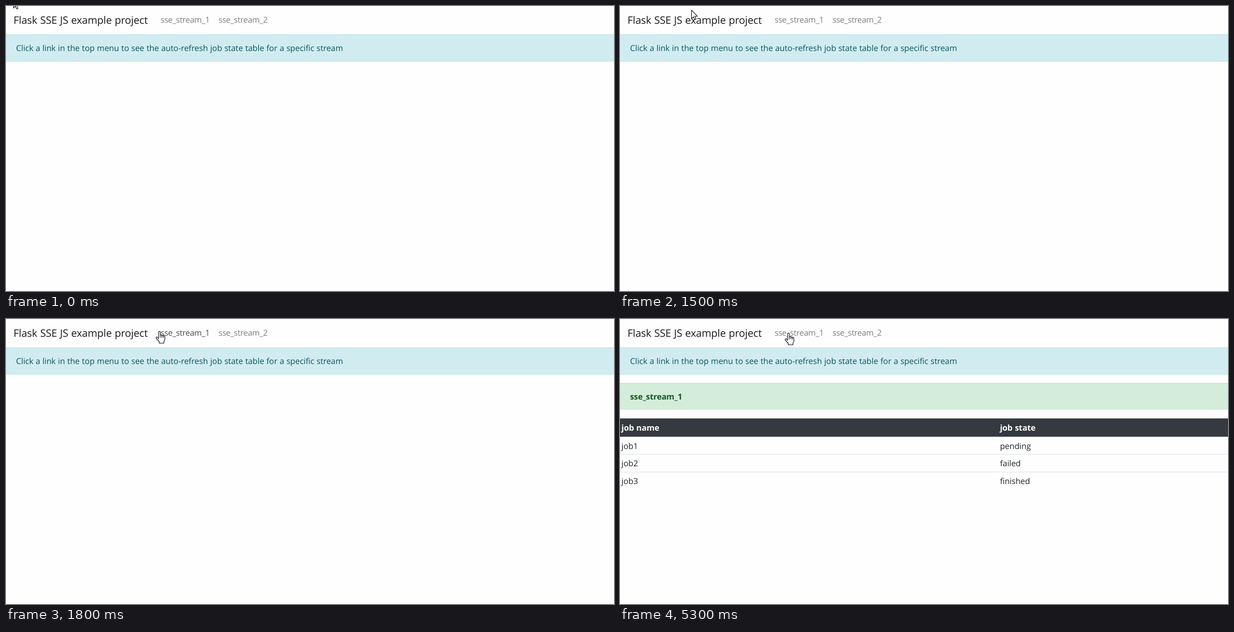
An HTML page for the animation above (8 s loop, 1092 by 513 pixels).

```html
<!DOCTYPE html>
<html lang="en">
<head>
<meta charset="utf-8">
<title>Job state table</title>
<style>
  html, body { margin: 0; width: 100%; height: 100%; overflow: hidden; background: #fefefe; }
  svg { display: block; width: 100%; height: 100%; }
  text {
    font: 14.68px "Open Sans", "Noto Sans", sans-serif;
    letter-spacing: -.005em;
    word-spacing: .026em;
    fill: #212529;
    text-rendering: geometricPrecision;
    white-space: pre;
  }
  .brand { font-size: 18.5px; fill: #19191a; }
  .link { fill: #7f7f7f; letter-spacing: -.3px; }
  .link.hover { fill: #4c4c4c; }
  .info rect { fill: #d1ecf1; stroke: #bee5eb; }
  .info text { fill: #0c5460; }
  .stream rect { fill: #d4edda; stroke: #c3e6cb; }
  .stream text { fill: #155724; font-weight: 700; letter-spacing: -.17px; }
  .head text { fill: #fff; font-weight: 700; }
  .rule { stroke: #dee2e6; }
  .cursor { fill: #fff; stroke: #1c1c2c; stroke-width: 1.15; stroke-linejoin: round; }
</style>
</head>
<body>
<svg viewBox="0 0 1092 513">
  <text class="brand" x="13.6" y="32">Flask SSE JS example project</text>
  <text class="link" id="link" x="277.7" y="30">sse_stream_1</text>
  <text class="link" x="381.7" y="30">sse_stream_2</text>

  <g class="info">
    <rect x="-2.5" y="51.5" width="1100" height="48"/>
    <text x="18.1" y="81">Click a link in the top menu to see the auto-refresh job state table for a specific stream</text>
  </g>

  <g id="table">
    <g class="stream">
      <rect x="-2.5" y="115.5" width="1100" height="47"/>
      <text x="18" y="145">sse_stream_1</text>
    </g>
    <g class="head">
      <rect y="179" width="1092" height="33" fill="#343a40"/>
      <rect y="211" width="1092" height="1" fill="#454d55"/>
      <text x="2.6" y="201">job name</text>
      <text x="682.4" y="201">job state</text>
    </g>
  </g>

  <g id="rows">
    <path class="rule" d="M0 243.5H1092M0 275.5H1092"/>
    <text x="2.6" y="234">job1</text><text x="682.4" y="234">pending</text>
    <text x="2.6" y="265">job2</text><text x="682.4" y="265">failed</text>
    <text x="2.6" y="297">job3</text><text x="682.4" y="297">finished</text>
  </g>

  <g class="cursor" id="cursor">
    <path id="arrow" transform="scale(.957)" d="M.5 .5V16.5L4.2 13 6.6 18.3 9 17.2 6.8 12H11.5Z"/>
    <g id="hand" transform="translate(-6 -1)">
      <path d="M5 13.5V2a1.6 1.6 0 0 1 3.2 0V7.5a1.4 1.4 0 0 1 2.8.6 1.4 1.4 0 0 1 2.7.7 1.35 1.35 0 0 1 2.6.9V15l-1.7 3.5V21.5H6.3V19L1 13a1.4 1.4 0 0 1 2.1-2Z"/>
      <path fill="none" d="M8.2 7.5V11.5M11 8.1V11.5M13.7 8.8V12"/>
    </g>
  </g>
</svg>
<script>
  const LOOP = 8000, TABLE_AT = 2900, ROWS_AT = 5300;
  const HOVER_AT = 1800, HAND_AT = 1600;

  // [time, x, y] of the pointer's hot spot
  const path = [
    [0, 13, -12], [1000, 13, -10], [1300, 36, -6], [1400, 82, 1], [1500, 128, 7],
    [1600, 171, 13], [1700, 228, 18], [1800, 275, 23], [1900, 302, 26]
  ];

  const el = id => document.getElementById(id);
  const [link, table, rows, cursor, arrow, hand] =
    ["link", "table", "rows", "cursor", "arrow", "hand"].map(el);
  const show = (node, on) => node.setAttribute("visibility", on ? "visible" : "hidden");

  function draw(now) {
    const t = now % LOOP;
    const [, x, y] = path.findLast(step => step[0] <= t);
    cursor.setAttribute("transform", `translate(${x} ${y})`);
    show(arrow, t < HAND_AT);
    show(hand, t >= HAND_AT);
    link.classList.toggle("hover", t >= HOVER_AT && t < TABLE_AT);
    show(table, t >= TABLE_AT);
    show(rows, t >= ROWS_AT);
  }

  const start = performance.now();
  function tick() {
    draw(performance.now() - start);
    requestAnimationFrame(tick);
  }
  tick();
</script>
</body>
</html>
```
